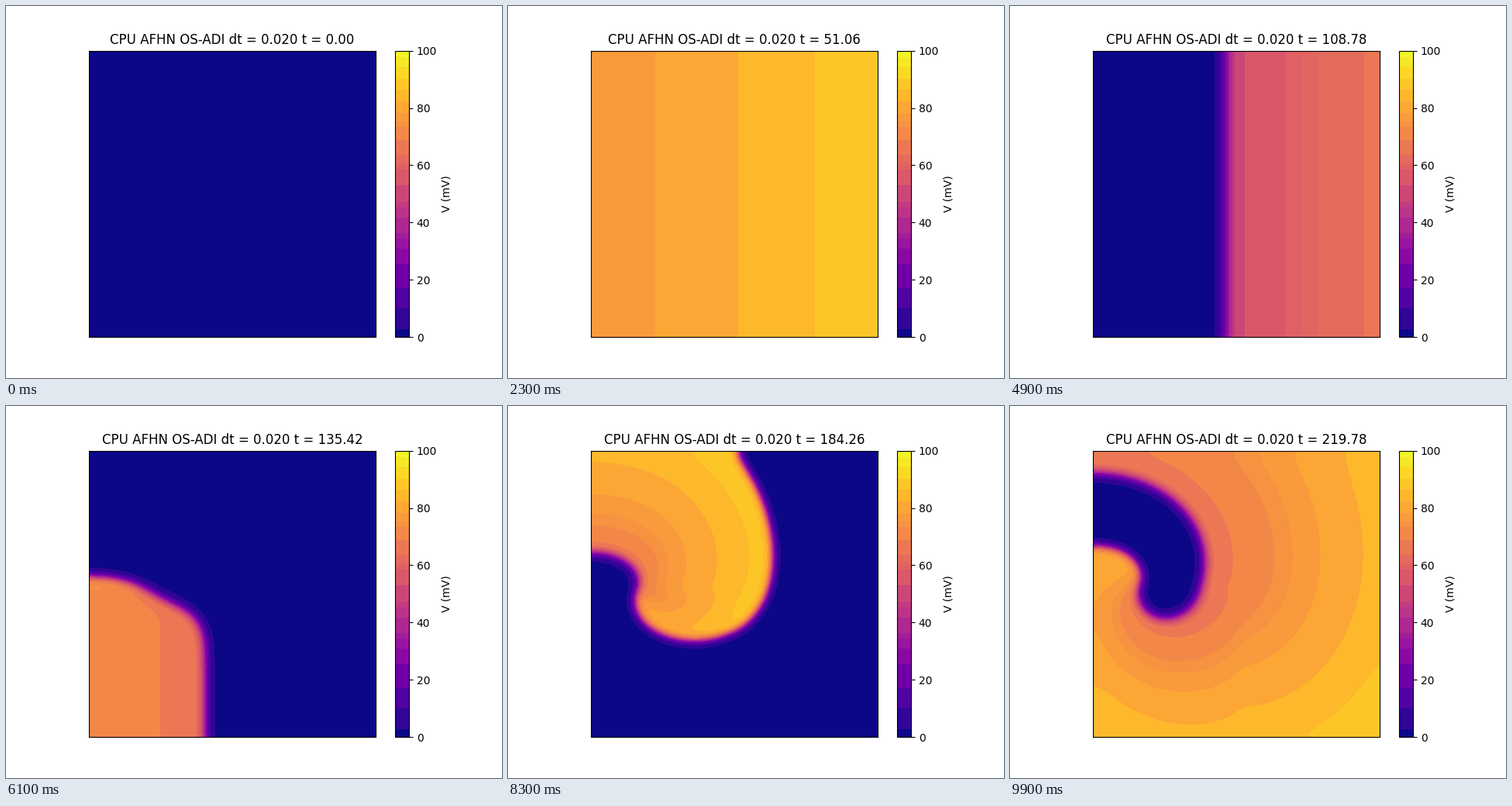
A matplotlib script for the animation above (10 s loop, 640 px wide and 480 px high).

```python
import numpy as np
import matplotlib.pyplot as plt
from matplotlib.animation import FuncAnimation
from matplotlib.colors import BoundaryNorm, ListedColormap

FRAMES = 100
FRAME_DT = 2.22            # model time between frames, ms
STEPS = 148                # time steps per frame
DT = FRAME_DT / STEPS

# Adapted FitzHugh-Nagumo model, potential scaled to 0..1
SIZE, N = 2.0, 200         # cm, cells per side
DX = SIZE / N
DIFF = 1.2e-3              # cm^2 / ms
VTH = 0.13
GAIN = 1.5 / VTH
ETA1, ETA2, ETA3 = 4.4, 0.012, 1.0
STIM, STIM_TIME = 1.0, 2.0
S1_WIDTH = 0.2
S2_START, S2_SIZE = 120.0, 1.0


def simulate():
    """Return the potential in mV at every frame time."""
    pad = np.zeros((N + 2, N + 2), np.float32)
    u = pad[1:-1, 1:-1]
    w = np.zeros((N, N), np.float32)
    lap = np.empty_like(w)
    rate = np.empty_like(w)
    tmp = np.empty_like(w)
    s1 = round(S1_WIDTH / DX)
    s2 = round(S2_SIZE / DX)
    kd = DIFF / DX ** 2

    shots = []
    for frame in range(FRAMES):
        shots.append(100 * u)
        for step in range(STEPS):
            t = frame * FRAME_DT + step * DT

            # no-flux borders
            pad[0], pad[-1] = pad[1], pad[-2]
            pad[:, 0], pad[:, -1] = pad[:, 1], pad[:, -2]

            np.add(pad[:-2, 1:-1], pad[2:, 1:-1], out=lap)
            lap += pad[1:-1, :-2]
            lap += pad[1:-1, 2:]
            np.multiply(u, 4, out=tmp)
            lap -= tmp
            lap *= kd * DT

            # u * (GAIN * (u - VTH) * (1 - u) - ETA1 * w)
            np.subtract(u, VTH, out=rate)
            np.subtract(1, u, out=tmp)
            rate *= tmp
            rate *= GAIN * DT
            np.multiply(w, ETA1 * DT, out=tmp)
            rate -= tmp
            rate *= u
            rate += lap

            np.multiply(w, ETA3, out=tmp)
            np.subtract(u, tmp, out=tmp)
            tmp *= ETA2 * DT
            w += tmp

            u += rate
            if t < STIM_TIME:
                u[:, :s1] += STIM * DT
            elif S2_START <= t < S2_START + STIM_TIME:
                u[:s2, :s2] += STIM * DT
    return shots


# Uneven colour bands, in mV
EDGES = np.array([0, 2.8, 10.1, 17.2, 25.6, 31, 34.5, 36.4, 41.8, 45.3, 47.2,
                  53.2, 58.6, 59.9, 61, 63.7, 68.9, 73.5, 75.4, 78.2, 82.4,
                  86.4, 90.2, 94.3, 97.8, 100])
mids = (EDGES[:-1] + EDGES[1:]) / 200
mids[0] = 0
cmap = ListedColormap(plt.get_cmap("plasma")(mids))
norm = BoundaryNorm(EDGES, cmap.N)

shots = simulate()

fig, ax = plt.subplots(figsize=(6.4, 4.8), dpi=100)
image = ax.imshow(shots[0], cmap=cmap, norm=norm, origin="lower",
                  extent=(0, SIZE, 0, SIZE), interpolation="bilinear",
                  interpolation_stage="data")
ax.set(xticks=[], yticks=[])
bar = fig.colorbar(image, ax=ax, label="V (mV)", spacing="proportional",
                   ticks=range(0, 101, 20))
bar.minorticks_off()
title = ax.set_title("")


def update(i):
    image.set_data(shots[i])
    title.set_text(f"CPU AFHN OS-ADI dt = 0.020 t = {i * FRAME_DT:.2f}")
    return image, title


anim = FuncAnimation(fig, update, frames=FRAMES, interval=100,
                     repeat=True, repeat_delay=0)
plt.show()
```
